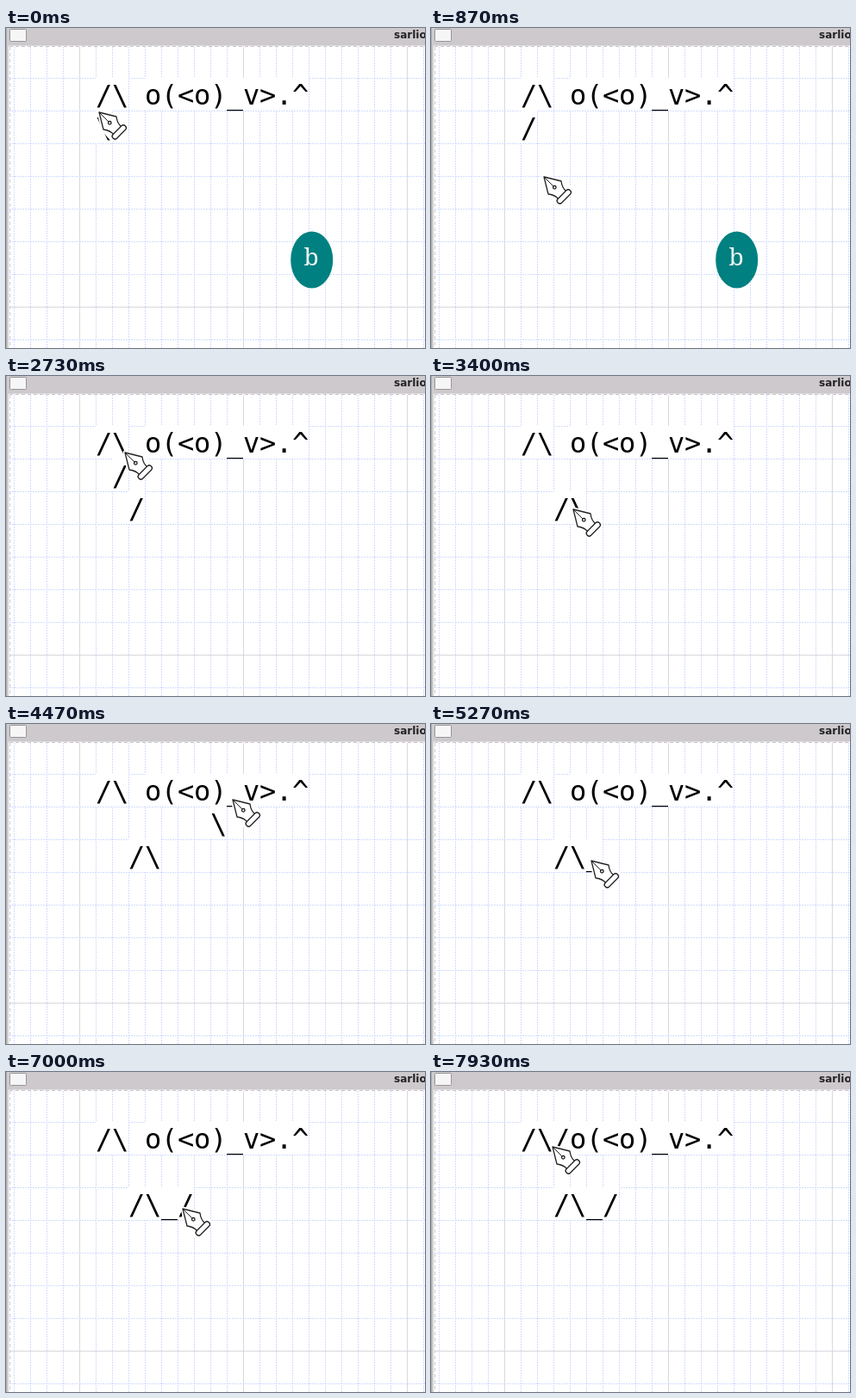
These frames come from a looping animation (486x372 px, 8 s). An HTML page:

```html
<!DOCTYPE html>
<html lang="en">
<head>
<meta charset="utf-8">
<title>Character drawing</title>
<style>
html, body { margin: 0; width: 100%; height: 100%; overflow: hidden; background: #fff; }
svg { display: block; }
.cell text { font: 32px "DejaVu Sans Mono", monospace; fill: #000; white-space: pre; }
.title { font: bold 12px "DejaVu Sans", sans-serif; fill: #222; }
.key { font: 28px "Noto Serif", serif; font-weight: 300; fill: #eef6f4; }
</style>
</head>
<body>
<svg width="486" height="372" viewBox="0 0 486 372">
  <rect width="486" height="372" fill="#fff"/>
  <g id="grid" shape-rendering="crispEdges"></g>
  <g shape-rendering="crispEdges">
    <rect width="486" height="20" fill="#cdc9cd"/>
    <rect y="20" width="486" height="1" fill="#e2dde2"/>
    <rect width="3" height="372" fill="#cfcdcf"/>
    <rect width="1" height="372" fill="#aaa"/>
    <path d="M4.5 22V372M4 21.5H486" stroke="#ccc6cc" stroke-dasharray="4 3"/>
  </g>
  <rect x="4.5" y="1.5" width="19" height="14" rx="1" fill="#f6f6f6" stroke="#999599"/>
  <text class="title" x="450" y="12">sarlio</text>
  <g id="key">
    <ellipse cx="354.7" cy="269.5" rx="24.5" ry="33" fill="#008080"/>
    <text class="key" x="354" y="276" text-anchor="middle">b</text>
  </g>
  <g id="cells"></g>
  <g id="pen" fill="#fff" stroke="#222" stroke-width="1.3" stroke-linejoin="round">
    <path d="M0 0L5 20L15 31L31 15L20 5Z" stroke="#fff" stroke-width="5"/>
    <path d="M0 0L20 5Q21 13 26 17L17 26Q13 21 5 20Z"/>
    <path d="M0 0L11 11" fill="none" stroke-width="1"/>
    <circle cx="12.3" cy="12.3" r="1.8"/>
    <rect x="-10" y="-3.2" width="20" height="6.4" rx="3" transform="translate(23.3 23) rotate(-45)"/>
  </g>
</svg>
<script>
const NS = 'http://www.w3.org/2000/svg';
const FPS = 15, STEPS = 120, LOOP = 8000;
const LEFT = 104, TOP = 58, CW = 19, CH = 38;
const PALETTE = '/\\ o(<o)_v>.^';
const KEY_END = 26;
// Rhythm of the trips to the palette, in steps
const FIRST = 33.7, PERIOD = 25.9, OUT = 10, PAUSE = 0.5, BACK = 9;

const $ = id => document.getElementById(id);

function add(parent, tag, attrs) {
  const node = document.createElementNS(NS, tag);
  for (const name in attrs) node.setAttribute(name, attrs[name]);
  return parent.appendChild(node);
}

function line(d, major) {
  add($('grid'), 'path', {
    d, stroke: major ? '#d8d8e0' : '#d2dcff',
    'stroke-dasharray': major ? 'none' : '2 1'
  });
}

function move(node, x, y) {
  node.setAttribute('transform', `translate(${x} ${y})`);
}

function place(node, col, row) {
  move(node, LEFT + col * CW, TOP + row * CH);
}

function cell(char, col, row) {
  const g = add($('cells'), 'g', { class: 'cell' });
  add(g, 'rect', { width: CW, height: CH, fill: '#fff' });
  add(g, 'text', { y: 31 }).textContent = char;
  place(g, col, row);
  return g;
}

for (let x = 9; x < 486; x += CW) line(`M${x + .5} 22V372`, (x - 85) % 190 === 0);
for (let y = TOP; y < 372; y += CH) line(`M4 ${y + .5}H486`, y === 324);
[...PALETTE].forEach((char, col) => char !== ' ' && cell(char, col, 0));

const legs = [];
let [endX, endY] = [108, 98];

function go(start, time, x, y, extra) {
  legs.push({ start, end: start + time, from: [endX, endY], to: [x, y], ...extra });
  [endX, endY] = [x, y];
}

const drop = (char, col) => ({ node: cell(char, col, 2) });

go(1, 4, 112, 84, { take: '/' });
go(9, 7, 140, 214);
go(23, 6, 145, 163, drop('/', 2));
[...'\\_/\\'].forEach((char, i) => {
  const leave = FIRST + i * PERIOD, col = i + 3;
  go(leave, OUT, LEFT + PALETTE.indexOf(char) * CW + 14, TOP + 25, { take: char });
  go(leave + OUT + PAUSE, BACK, LEFT + col * CW + 6, TOP + 2 * CH + 25, drop(char, col));
});
const held = cell('\\', 0, 1);

const ease = u => u < .5 ? 4 * u ** 3 : 1 - 4 * (1 - u) ** 3;

function tip(step) {
  const leg = legs.filter(l => l.start <= step).pop() || legs[0];
  const u = (step - leg.start) / (leg.end - leg.start);
  const e = ease(Math.min(1, Math.max(0, u)));
  return leg.from.map((v, i) => v + (leg.to[i] - v) * e);
}

function draw(step) {
  move($('pen'), ...tip(step).map(Math.round));
  // The held character trails the pen by one step.
  const [x, y] = tip(step - 1);
  place(held, Math.floor((x - LEFT) / CW), Math.floor((y - TOP) / CH));
  let char = '\\';
  for (const { end, take, node } of legs) {
    if (take && end <= step) char = take;
    if (node) node.style.display = end <= step ? '' : 'none';
  }
  held.lastChild.textContent = char;
  $('key').style.display = step < KEY_END ? '' : 'none';
}

const start = performance.now();
function tick() {
  const t = (performance.now() - start) % LOOP;
  draw(Math.min(STEPS - 1, Math.floor((t + 5) * FPS / 1000)));
  requestAnimationFrame(tick);
}
tick();
</script>
</body>
</html>
```
